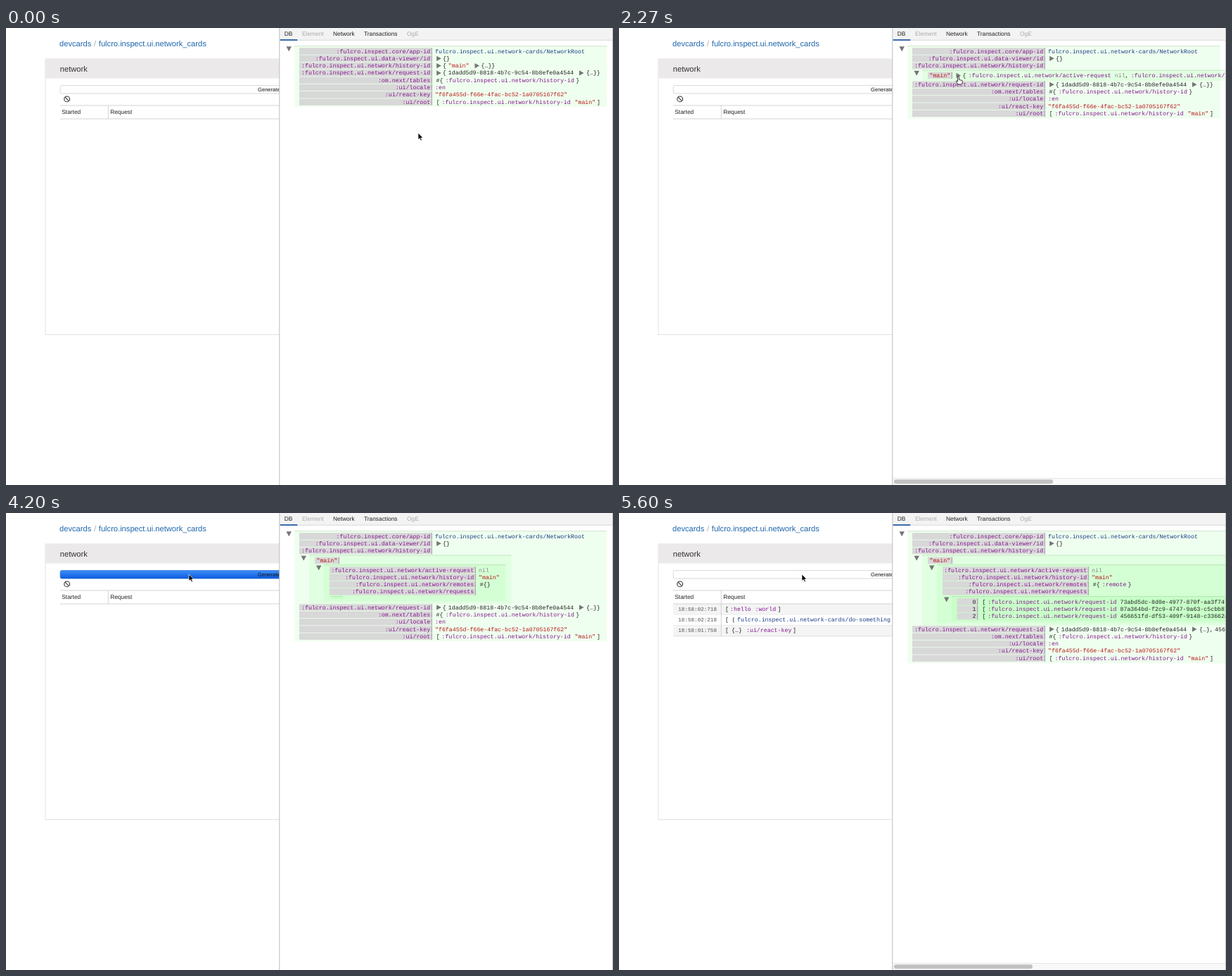
Animation, 863 px wide and 649 px high, one loop 8 s. Source, as an HTML page:

```html
<!DOCTYPE html>
<html lang="en">
<head>
<meta charset="utf-8">
<title>Inspector</title>
<style>
  html, body { margin: 0; width: 100%; height: 100%; overflow: hidden; background: #fff; }
  svg { display: block; width: 863px; height: 649px; }
  text { font-family: "Liberation Sans", Arial, sans-serif; font-size: 8.35px; fill: #222; text-rendering: geometricPrecision; }
  .title { font-size: 11.15px; }
  .mono { font-family: "Liberation Mono", "Courier New", monospace; font-size: 8.25px; }
  .time { font-size: 7.6px; }
</style>
</head>
<body>
<svg viewBox="0 0 863 649">
  <defs>
    <linearGradient id="pressed" x2="0" y2="1">
      <stop stop-color="#3f8ff8"/><stop offset="1" stop-color="#0b5be0"/>
    </linearGradient>
    <clipPath id="pageClip"><path d="M0 0H388.5V649H0z"/></clipPath>
    <clipPath id="panelClip"><path d="M389 0H862V649H389z"/></clipPath>
  </defs>
  <g id="page" clip-path="url(#pageClip)"></g>
  <g id="panel" clip-path="url(#panelClip)"></g>
  <path d="M388.8 0V649M862.5 0V649" stroke="#bdbdbd" fill="none"/>
  <path id="arrow" d="M0 0V9.6L2.2 7.6L3.8 11L5.4 10.3L3.9 7H6.8z" fill="#000" stroke="#fff" stroke-width=".7"/>
  <path id="hand" d="M-1 1q0-1 1-1t1 1v3.5l3.6.8q1.4.3 1.2 1.8l-.5 3q-.2.9-1 .9h-4q-.8 0-1.2-.7l-2.2-3.2q-.5-1 .6-1.1l1.5 1z" fill="#fff" stroke="#222" stroke-width=".9"/>
</svg>
<script>
const LOOP = 8000, STEP = 200 / 3, PITCH = 10.31;
const NET = ':fulcro.inspect.ui.network/';
const CARDS = 'fulcro.inspect.ui.network-cards/';
const IDS = [
  '73abd5dc-8d0e-4977-870f-aa3f747c3b21',
  '87a364bd-f2c9-4747-9a63-c5cbb87e10d4',
  '456651fd-df53-409f-9148-c33662ab7f05'
];
const REQUESTS = [
  ['18:58:01:758', [151, '['], [160, '{…}'], [181, ':ui/react-key'], [247, ']']],
  ['18:58:02:218', [151, '['], [160.5, '('], [168, CARDS + 'do-something']],
  ['18:58:02:718', [151, '['], [158, ':hello'], [193.5, ':world'], [225.5, ']']]
];
const $ = id => document.getElementById(id);

const inkOf = s =>
  s[0] === ':' ? '#85158f' :
  s[0] === '"' ? '#b81a1a' :
  s === 'nil' ? '#888' :
  s.startsWith('fulcro') ? '#173a86' : '#222';

const rect = (x, y, right, bottom, fill, extra = '') =>
  `<rect x="${x}" y="${y}" width="${right - x}" height="${bottom - y}" fill="${fill}" ${extra}/>`;
const label = (x, y, s, fill = '#222', cls = '') =>
  `<text x="${x}" y="${y}" fill="${fill}" style="fill:${fill}" class="${cls}">${s}</text>`;
const mono = (x, y, s, anchor = 'start') =>
  `<text class="mono" x="${x}" y="${y + 2.5}" text-anchor="${anchor}" style="fill:${inkOf(s)}">${s}</text>`;
const path = (d, stroke, width = 1) =>
  `<path d="${d}" fill="none" stroke="${stroke}" stroke-width="${width}"/>`;
const closed = (x, y) => `<path d="M${x} ${y - 3.6}v7.2l6.6-3.6z" fill="#757575"/>`;
const opened = (x, y) => `<path d="M${x - 3.7} ${y - 3.4}h7.4l-3.7 7z" fill="#757575"/>`;
const box = (x, y, right, bottom) =>
  rect(x, y, right, bottom, 'rgba(100,255,100,.1)') + rect(x, y, right, y + 1.2, 'rgba(60,90,60,.13)');
const values = (y, list) => list.map(([x, s]) => s === '>' ? closed(x, y) : mono(x, y, s)).join('');
const row = (x, right, y, key, ...list) =>
  rect(x, y - 4.8, right, y + 4.7, '#d8d8d8') + rect(right - 1.2, y - 4.8, right, y + 4.7, '#a9a9a9') +
  mono(right - 2.8, y, key, 'end') + values(y, list);

function drawPage(count, pressed) {
  let out = label(76, 25.5, 'devcards', '#1f66ad', 'title') + label(125, 25.5, '/', '#aaa', 'title') +
    label(131.8, 25.5, 'fulcro.inspect.ui.network_cards', '#1f66ad', 'title') +
    rect(56, 44, 400, 435.5, '#fff', 'stroke="#e2e2e2"') + rect(56, 44, 400, 71.5, '#ece9ea') +
    label(76.8, 62, 'network', '#333', 'title') +
    rect(77.2, 81.7, 700, 93, pressed ? 'url(#pressed)' : '#fff',
      `rx="2" stroke="${pressed ? '#1561d2' : '#cfcfcf'}" stroke-width=".8"`) +
    `<text x="358" y="90.2" style="font-size:7.6px;fill:#111">Generate</text>` +
    `<circle cx="86.7" cy="100.9" r="3.9" fill="none" stroke="#333" stroke-width="1.1"/>` +
    path('M84 98.2l5.4 5.4', '#333', 1.1) +
    label(79.3, 122, 'Started') + label(148.2, 122, 'Request');
  REQUESTS.slice(0, count).reverse().forEach(([time, ...parts], i) => {
    const top = 129.2 + i * 15.2, mid = top + 7.2;
    out += rect(77, top, 400, top + 15.2, i % 2 ? '#fff' : '#f4f4f4') +
      `<text class="mono time" x="84.3" y="${mid + 2.6}" style="fill:#555">${time}</text>` +
      values(mid, parts) + path(`M77 ${top + 15.2}H400`, '#d6d6d6', .8);
  });
  out += path(`M77 110H400M77 129H400M145.3 110V${129 + count * 15.2}`, '#cdcdcd', .9);
  $('page').innerHTML = out;
}

// depth: how many map levels are open below the root
function drawPanel(depth, count) {
  const wide = depth === 1 || count > 0;
  const main = (x, right, y, ...list) => row(x, right, y, ...list);
  const tail = depth === 0 ? 63.9 : depth === 1 ? 80.3 : 134.1 + count * PITCH;
  let out = rect(389, 0, 863, 649, '#fff') + rect(389, 0, 863, 17, '#f3f3f3') +
    path('M389 17.3H863', '#cfcfcf', .8) + rect(389.5, 16, 414.3, 18, '#3b6cab') +
    label(395.8, 11, 'DB') + label(421, 11, 'Element', '#aaa') + label(465, 11, 'Network') +
    label(509, 11, 'Transactions') + label(570, 11, 'OgE', '#aaa');

  out += box(410, 25, count ? 870 : depth === 1 ? 855 : 854, tail + 4 * PITCH + 7);
  if (depth) out += box(431, 59.5, wide ? 870 : 718.5, tail - 5.2);
  if (depth === 2) {
    out += box(452, 73, wide ? 870 : 710.5, tail - 8.7) +
      box(count > 1 ? 473 : 462.5, 118, wide ? 870 : 479, tail - 12);
  }

  const top = (y, ...rest) => main(417, 606, y, ...rest);
  out += opened(402.2, 29.6) +
    top(33, ':fulcro.inspect.core/app-id', [610, CARDS + 'NetworkRoot']) +
    top(43.3, ':fulcro.inspect.ui.data-viewer/id', [612.2, '>'], [621, '{}']);
  const history = depth ? [] : [[612.2, '>'], [621, '{'], [628.8, '"main"'], [666.5, '>'], [675.5, '{…}}']];
  out += top(53.6, NET + 'history-id', ...history);

  if (depth) {
    out += opened(423.2, 64.2) + row(439, 474, 67.4, '"main"');
    if (depth === 1) {
      out += values(67.4, [[479.5, '>'], [488.5, '{'], [496.8, NET + 'active-request'],
        [704.8, 'nil'], [719.6, ','], [727.8, NET + 'history-id']]);
    }
  }
  if (depth === 2) {
    const inner = (i, key, ...list) => row(460, 668, 81 + i * PITCH, NET + key, ...list);
    const remotes = count ? [[673.8, '#{'], [686.8, ':remote'], [723.5, '}']] : [[673.8, '#{}']];
    out += opened(444.7, 77.8) + inner(0, 'active-request', [672, 'nil']) +
      inner(1, 'history-id', [672, '"main"']) + inner(2, 'remotes', ...remotes) + inner(3, 'requests');
    const shift = count > 1 ? 10.5 : 0;
    if (shift) out += opened(465.7, 122.8);
    IDS.slice(0, count).forEach((id, i) => {
      out += row(470 + shift, 499.8 + shift, 126 + i * PITCH, String(i),
        [506 + shift, '['], [513.7 + shift, NET + 'request-id'], [702 + shift, id]);
    });
  }

  const next = count === 3 ? IDS[2] : IDS[0];
  const more = count ? [[825, '{…},'], [847, next]] : [[825, '{…}}']];
  out += top(tail, NET + 'request-id', [612.2, '>'], [620.8, '{'],
      [628.8, '1dadd5d9-8818-4b7c-9c54-8b8efe0a4544'], [815, '>'], ...more) +
    top(tail + PITCH, ':om.next/tables', [611.5, '#{'], [624.8, NET + 'history-id'], [810.3, '}']) +
    top(tail + 2 * PITCH, ':ui/locale', [610, ':en']) +
    top(tail + 3 * PITCH, ':ui/react-key', [610, '"f6fa455d-f66e-4fac-bc52-1a0705167f62"']) +
    top(tail + 4 * PITCH, ':ui/root', [611.8, '['], [619.5, NET + 'history-id'], [808.5, '"main"'], [840, ']']);

  if (wide) {
    const content = depth === 1 ? 990 : 464 + 224 * count;
    out += rect(389, 639.5, 863, 649, '#f8f8f8') + path('M389 639.5H863', '#e3e3e3', .8) +
      rect(391, 641.3, 391 + 473 * 473 / content, 647.2, '#c1c1c1', 'rx="2.9"');
  }
  $('panel').innerHTML = out;
}

// time, x, y of the pointer tip
const TRACK = [
  [67, 586, 149], [200, 596, 130], [400, 624, 82], [530, 622, 60], [670, 616, 52],
  [1333, 616, 52], [1533, 602.7, 60], [1867, 530, 69], [2200, 482.5, 69],
  [2933, 482.5, 69], [3067, 405, 85], [3267, 268.5, 105], [3467, 263, 97], [3667, 260, 87]
];
function pointerAt(t) {
  const i = TRACK.findIndex(k => k[0] > t);
  if (i === 0) return TRACK[0].slice(1);
  if (i < 0) return TRACK[TRACK.length - 1].slice(1);
  const [a, b] = [TRACK[i - 1], TRACK[i]];
  const u = (t - a[0]) / (b[0] - a[0]);
  return [1, 2].map(n => a[n] + (b[n] - a[n]) * u);
}

const within = (t, from, to) => t >= from && t < to;
let shown = '';

function render(t) {
  const depth = t < 1070 ? 0 : t < 2600 ? 1 : 2;
  const count = [4330, 4800, 5270].filter(click => t >= click).length;
  const pressed = within(t, 4200, 4330) || within(t, 4670, 4800) || within(t, 5130, 5270);
  const state = [depth, count, pressed].join();
  if (state !== shown) {
    drawPage(count, pressed);
    drawPanel(depth, count);
    shown = state;
  }
  const [x, y] = pointerAt(Math.floor((t + 4) / STEP) * STEP);
  const link = within(t, 670, 1130) || within(t, 2270, 2600);
  for (const id of ['arrow', 'hand']) {
    $(id).setAttribute('transform', `translate(${x} ${y})`);
    $(id).setAttribute('visibility', (id === 'hand') === link ? 'visible' : 'hidden');
  }
}

const start = performance.now();
function tick() {
  render((performance.now() - start) % LOOP);
  requestAnimationFrame(tick);
}
tick();
</script>
</body>
</html>
```
